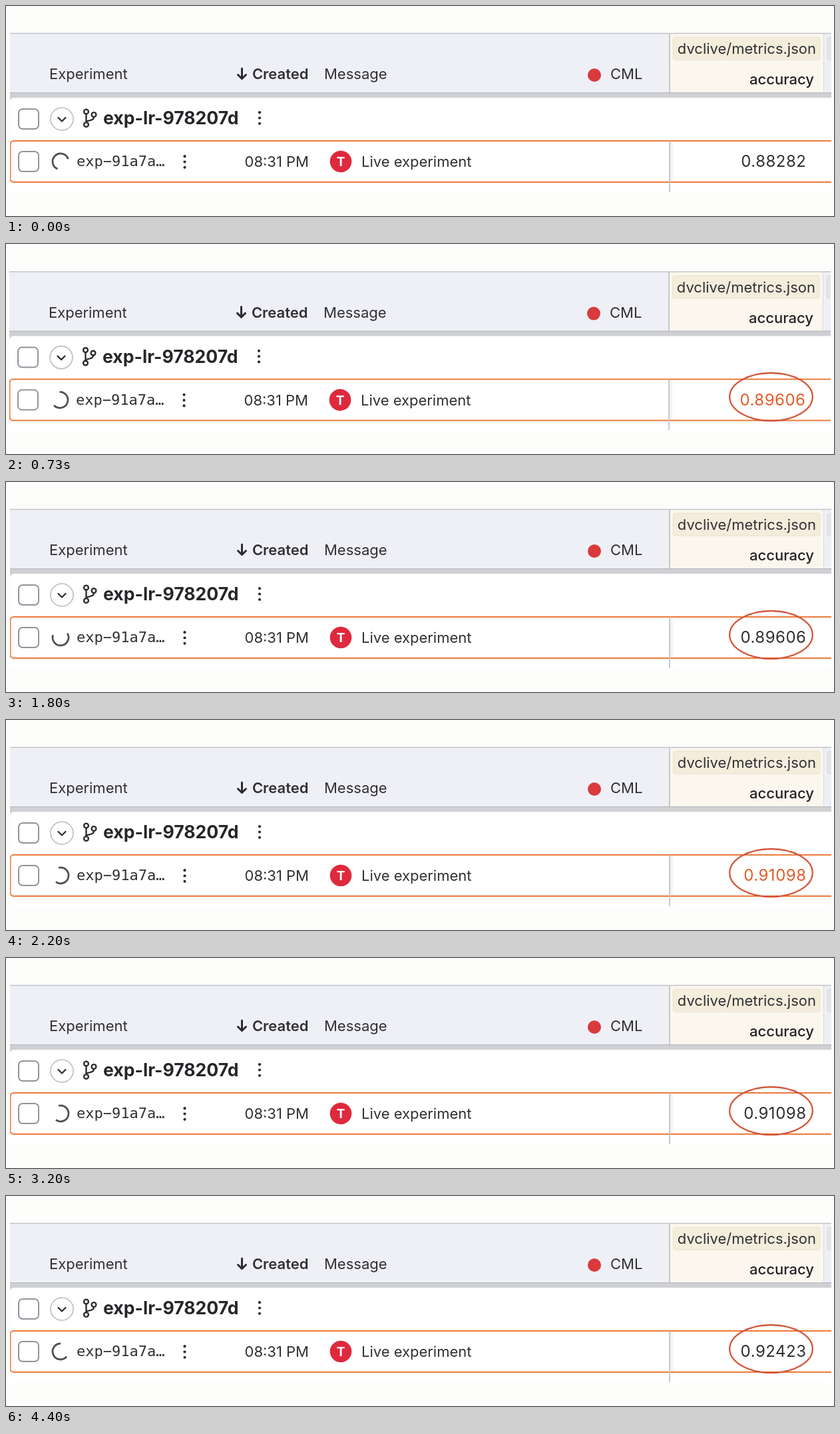
Recreate the animation shown at these times as an HTML page. Size 1244 by 316 pixels, loop 4.47 s.

```html
<!DOCTYPE html>
<html lang="en">
<head>
<meta charset="utf-8">
<title>Live experiment table</title>
<style>
  html, body { margin: 0; width: 100%; height: 100%; overflow: hidden; background: #fdfefc; }
  svg { display: block; width: 1244px; height: 316px; }
  text { font: 400 22px Inter, "Liberation Sans", sans-serif; fill: #303034; }
  .semi { font-weight: 600; }
  .medium { font-weight: 500; fill: #222226; }
  .branch { font-size: 26.6px; font-weight: 700; fill: #26262a; }
  .mono { font-family: "DejaVu Sans Mono", monospace; }
  .value { font-size: 24px; letter-spacing: .5px; }
  .avatar { font-size: 19px; font-weight: 700; fill: #fff; }
  .end { text-anchor: end; }
  .mid { text-anchor: middle; }
  .line { fill: none; stroke: #2c2c30; stroke-linecap: round; stroke-linejoin: round; }
  .box { fill: #fff; stroke: #92929c; stroke-width: 2; }
</style>
</head>
<body>
<svg viewBox="0 0 1244 316" xmlns="http://www.w3.org/2000/svg">
  <defs>
    <clipPath id="panel"><rect x="6" y="40" width="1234" height="240"/></clipPath>
    <clipPath id="wipe"><rect id="wipeRect" x="1086" y="190" width="0" height="80"/></clipPath>
    <linearGradient id="shade">
      <stop offset="0" stop-color="#666" stop-opacity=".12"/>
      <stop offset="1" stop-color="#666" stop-opacity="0"/>
    </linearGradient>
    <g id="dots" fill="#2c2c30">
      <circle cy="-8.3" r="2.1"/><circle r="2.1"/><circle cy="8.3" r="2.1"/>
    </g>
  </defs>

  <g id="table">
    <g clip-path="url(#panel)">
      <!-- header -->
      <rect x="6" y="41" width="1234" height="90" fill="#eff0f5"/>
      <rect x="998" y="41" width="230" height="90" fill="#fbf7ee"/>
      <rect x="1002.5" y="47" width="220.5" height="34" rx="3" fill="#f4eddc" stroke="#e9e1cc"/>
      <rect x="1234" y="47" width="20" height="34" rx="3" fill="#e4e5e8" stroke="#d8d9dd"/>
      <path d="M1228.5 41V130" stroke="#dcdde0"/>
      <path d="M6 41.2H1240" stroke="#c3c5ca" stroke-width="1.6"/>
      <rect x="6" y="130" width="1234" height="14" fill="#cfd0d3"/>
      <path d="M6 130.5H1240" stroke="#b4b6bb"/>

      <!-- rows -->
      <rect x="6" y="138" width="1250" height="64" rx="6" fill="#fff"/>
      <rect x="6" y="202" width="1234" height="80" fill="#fff"/>
      <rect x="6.5" y="203" width="1260" height="62" rx="5" fill="#fff" stroke="#ec7a3c" stroke-width="2"/>
      <rect x="998" y="204" width="6" height="60" fill="url(#shade)"/>
      <path d="M997 41V130M997 203V280" stroke="#c4c5cb" stroke-width="1.8"/>
    </g>

    <!-- header labels -->
    <text x="65" y="110">Experiment</text>
    <path class="line" stroke-width="3" d="M354.5 94V109M348.5 103.5L354.5 109.5L360.5 103.5"/>
    <text class="semi end" x="454.5" y="110">Created</text>
    <text x="478" y="110">Message</text>
    <circle cx="884" cy="104" r="10" fill="#d93a3c"/>
    <text x="908" y="110">CML</text>
    <text class="end" x="1217" y="72">dvclive/metrics.json</text>
    <text class="medium end" x="1214" y="118">accuracy</text>

    <!-- branch row -->
    <rect class="box" x="19" y="155" width="30" height="30" rx="6"/>
    <circle cx="84" cy="170" r="17" fill="#fff" stroke="#bdbdc1" stroke-width="1.6"/>
    <path class="line" stroke-width="2.2" d="M78.5 168L84 173.5L89.5 168"/>
    <g class="line" stroke-width="2.4">
      <circle cx="120.5" cy="159" r="3.4"/>
      <circle cx="120.5" cy="178.500" r="3.4"/>
      <circle cx="132" cy="163.500" r="3.4"/>
      <path d="M120.500 162.500V175M132 167C132 172 127 171.500 121 173.500"/>
    </g>
    <text class="branch" x="146" y="178">exp-lr-978207d</text>
    <use href="#dots" x="381" y="168.500"/>

    <!-- experiment row -->
    <rect class="box" x="19" y="219" width="30" height="30" rx="6"/>
    <path id="spinner" class="line" style="stroke:#505054;stroke-linecap:butt" stroke-width="2.8"/>
    <text class="mono" x="106" y="241">exp−91a7a…</text>
    <use href="#dots" x="268.500" y="234.500"/>
    <text class="end" x="455" y="242">08:31 PM</text>
    <circle cx="503" cy="234" r="16.300" fill="#df293c"/>
    <text class="avatar mid" x="503" y="241">T</text>
    <text x="534" y="242">Live experiment</text>
    <text id="value" class="value end" x="1202.500" y="242"></text>
  </g>

  <ellipse cx="1149.500" cy="230" rx="62.300" ry="36" fill="none" stroke="#d4573a"
           stroke-width="2.300" clip-path="url(#wipe)"/>
</svg>

<script>
  const LOOP = 4470, STEP = 1000 / 15;
  const $ = id => document.getElementById(id);
  const clamp = v => Math.max(0, Math.min(1, v));

  // [first step, text]
  const VALUES = [[-99, "0.88282"], [11, "0.89606"], [32, "0.91098"], [53, "0.92423"]];
  const HOT = [228, 92, 40], INK = [48, 48, 52];
  const mix = p => `rgb(${HOT.map((h, i) => Math.round(h + (INK[i] - h) * p))})`;

  // Open ring with a 130 degree gap centred on the x axis
  const gap = 65 * Math.PI / 180, R = 12;
  const gx = R * Math.cos(gap), gy = R * Math.sin(gap);
  $("spinner").setAttribute("d", `M${gx} ${gy}A${R} ${R} 0 1 1 ${gx} ${-gy}`);

  function draw(t) {
    const step = Math.floor((t + 5) / STEP);

    // Half-wave drift of the table early in the loop
    const drift = step < 14 ? Math.sin(Math.PI * step / 14) : 0;
    $("table").setAttribute("transform", `translate(${-1.6 * drift} ${drift})`);

    // Two turns per second; the ring lags slightly while the table drifts
    const angle = 47 + 48 * step - 20 * drift;
    $("spinner").setAttribute("transform", `translate(82 234) rotate(${angle})`);

    const [since, text] = VALUES.filter(v => v[0] <= step).pop();
    $("value").textContent = text;
    $("value").style.fill = mix(clamp((step - since - 2) / 2.3));

    $("wipeRect").setAttribute("width", 128 * clamp((step - 3) / 6.75));
  }

  const start = performance.now();
  function tick() {
    draw((performance.now() - start) % LOOP);
    requestAnimationFrame(tick);
  }
  tick();
</script>
</body>
</html>
```
